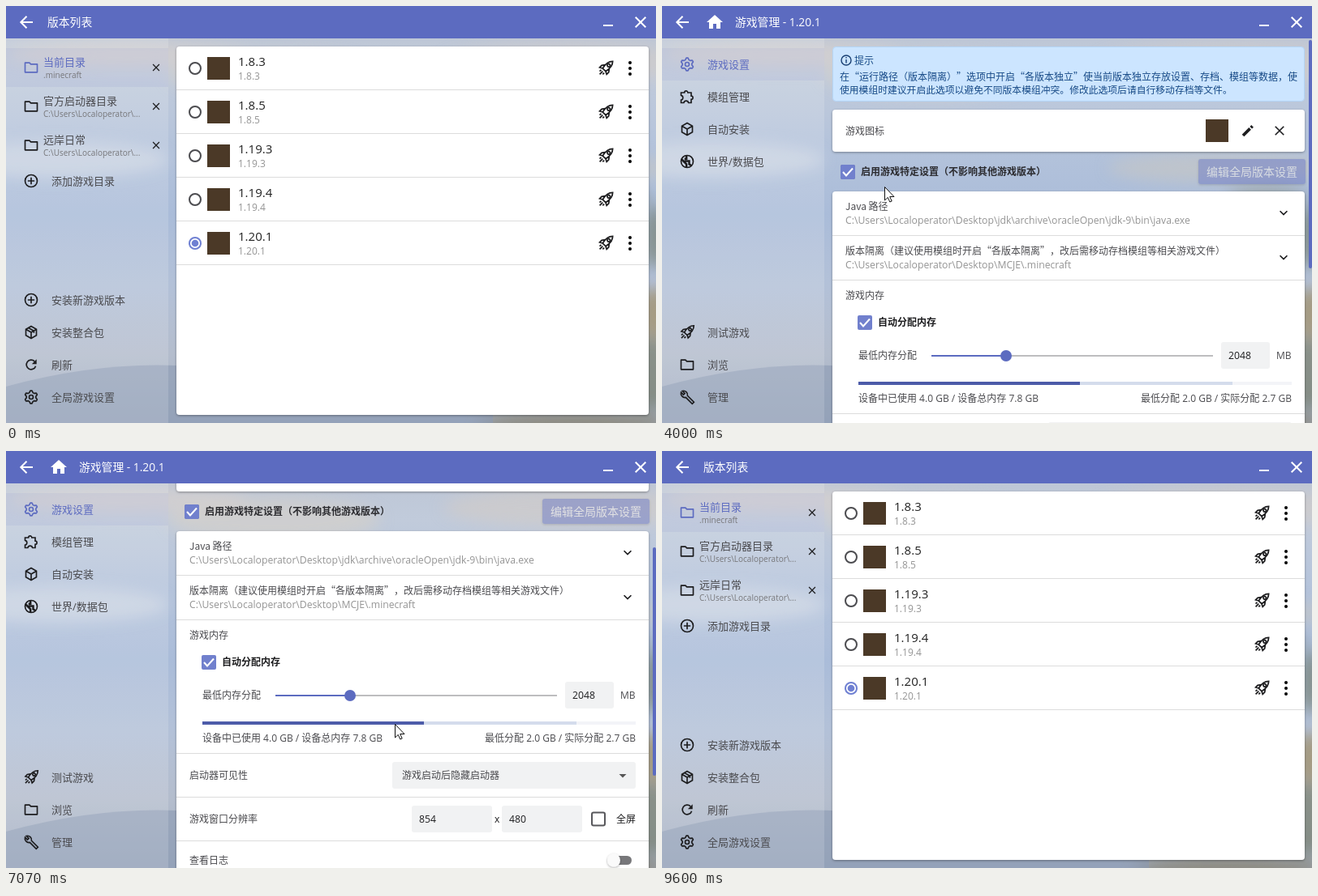
Animation, 801 px wide and 515 px high, one loop 9.99 s. Source, as an HTML page:

```html
<!DOCTYPE html>
<html lang="zh-CN">
<head>
<meta charset="utf-8">
<title>版本列表</title>
<style>
  html, body { margin: 0; width: 100%; height: 100%; overflow: hidden; background: #b4c3d9; }
  svg { display: block; width: 801px; height: 515px; }
  text { font-family: "Open Sans", "Noto Sans CJK SC", "Noto Sans CJK", sans-serif; white-space: pre; }
  .cjk { font-family: "Noto Sans CJK SC", "Noto Sans CJK", sans-serif; text-spacing-trim: space-all; }
  .icon { fill: none; stroke: currentColor; stroke-width: 2; }
  .solid { fill: currentColor; stroke: none; }
</style>
</head>
<body>
<svg id="stage" viewBox="0 0 801 515" xmlns="http://www.w3.org/2000/svg"></svg>
<script>
const LOOP = 9990, MAX_SCROLL = 325;
const BLUE = '#5c6bc0', INK = '#1d1d1f', TEXT = '#4a4a4e', GREY = '#949494', SOFT = '#f1f2f3';
const USER = 'C:\\Users\\Localoperator\\';
const BOLD = 'font-weight="700"', CJK = 'class="cjk"';

// Drawing helpers
const path = (d, attrs = '') => `<path d="${d}" ${attrs}/>`;
const circle = (x, y, r, attrs = '') => `<circle cx="${x}" cy="${y}" r="${r}" ${attrs}/>`;
const rect = (x, y, w, h, fill, r = 0, attrs = '') =>
  `<rect x="${x}" y="${y}" width="${w}" height="${h}" rx="${r}" fill="${fill}" ${attrs}/>`;
const text = (x, y, s, size = 12, color = INK, attrs = '') =>
  `<text x="${x}" y="${y}" font-size="${size}" fill="${color}" ${attrs}>${s}</text>`;
const group = (body, attrs) => `<g ${attrs}>${body}</g>`;
const polar = (deg, r) => {
  const a = deg * Math.PI / 180;
  return `${(12 + r * Math.cos(a)).toFixed(2)} ${(12 + r * Math.sin(a)).toFixed(2)}`;
};
const ring = (n, point) => `M${Array.from({ length: n }, (_, i) => point(i)).join('L')}Z`;

// Icons on a 24 unit grid
const cube = path(ring(6, i => polar(i * 60 - 90, 9)) +
  [-150, -30, 90].map(a => `M12 12L${polar(a, 9)}`).join(''));
const gear = path(ring(24, i => polar(i * 15 - 97.5, i % 4 < 2 ? 9.6 : 7)), 'stroke-linejoin="round"') + circle(12, 12, 3);
const ICONS = {
  cube, gear,
  box: cube + path('M8 5.500L16 10V13'),
  back: path('M20 12H6M12.500 4.700L5.300 12L12.500 19.300'),
  home: path('M2 12L12 3L22 12H19V20H14V14H10V20H5V12Z', 'class="solid"'),
  close: path('M5.700 5.700L18.300 18.300M18.300 5.700L5.700 18.300'),
  chevron: path('M6.700 9.300L12 14.600L17.300 9.300'),
  folder: path('M3 5H9.500L11.500 7H21V19H3Z', 'stroke-linejoin="round"'),
  plus: circle(12, 12, 9) + path('M7 12H17M12 7V17'),
  refresh: path('M18.700 14A7 7 0 1 1 17 7') + path('M20 4V11H13Z', 'class="solid"'),
  pencil: path('M4 20L15.500 8.500M17 7L19.500 4.500', 'stroke-width="5"'),
  earth: circle(12, 12, 9) + path('M4 9L11 16V21M8 11.500H15V16L18 18M11 3V8H8', 'stroke-width="3"'),
  puzzle: path('M18 6H13A2.500 2.500 0 1 0 8 6H3V10A3.600 3.600 0 0 1 3 17V21H7A3.600 3.600 0 0 1 14 21H18V16A2.500 2.500 0 1 0 18 11Z'),
  wrench: path('M10 12.500L19.500 22L22 19.500L12.500 10A6 6 0 0 0 5 3L8.500 6.500L6.500 8.500L3 5A6 6 0 0 0 10 12.500Z'),
  rocket: group(path('M12-2C16 2 16.500 9 15 15H9C7.500 9 8 2 12-2ZM8 9L5 13V17L9 15M16 9L19 13V17L15 15M12 18V24M9 18V21M15 18V21') +
    circle(12, 6, 2), 'transform="rotate(45 12 12)"')
};
const icon = (name, cx, cy, size = 20, color = INK) =>
  group(ICONS[name], `class="icon" color="${color}" transform="translate(${cx - size / 2} ${cy - size / 2}) scale(${size / 24})"`);

// Widgets
const card = (y, h) => rect(210, y, 582, h, '#fff', 4, 'filter="url(#shadow)"');
const divider = y => rect(210, y, 582, 1, '#dcdcdc');
const block = (cx, cy) => rect(cx - 14, cy - 14, 28, 28, '#4b3927');
const title = (x, s) => text(x, 25, s, 13.8, '#fff', 'font-weight="500"');
const label = (y, s) => text(226, y, s, 12, TEXT, CJK);
const emptyBox = (cx, cy) => rect(cx - 8, cy - 8, 16, 16, 'none', 2, 'stroke="#58585c" stroke-width="2"');
const tickBox = (cx, cy) => rect(cx - 9, cy - 9, 18, 18, '#7180cd', 2) +
  path(`M${cx - 6} ${cy}l4 4.500 8-9`, 'fill="none" stroke="#fff" stroke-width="2"');
const field = (x, y, w, s) => rect(x, y, w, 33, SOFT, 3) + text(x + 9, y + 21, s, 12.2);
const choice = s => rect(476, 10.5, 300, 33, SOFT, 3) + text(488, 31.5, s, 12, TEXT) +
  path('M755.500 25.500h9l-4.500 4.500z', 'fill="#555"');
const selected = h => rect(0, 52, 200, h, BLUE, 0, 'opacity=".08"');

// Sidebar entries 40 px apart
const menu = (top, items, active) => items.map(([name, s], i) => {
  const cy = top + i * 40, on = i === active;
  return icon(name, 31, cy, 20, on ? BLUE : INK) + text(56, cy + 5, s, 13, on ? BLUE : TEXT);
}).join('');

function listPage() {
  const folders = [['当前目录', '.minecraft'], ['官方启动器目录', USER + '...'], ['远岸日常', USER + '...']];
  const versions = ['1.8.3', '1.8.5', '1.19.3', '1.19.4', '1.20.1'];
  return title(51, '版本列表') + selected(48) +
    folders.map(([name, dir], i) => {
      const cy = 76 + i * 48, color = i ? INK : BLUE;
      return icon('folder', 31, cy, 20, color) + text(46, cy - 2, name, 13, i ? TEXT : BLUE) +
        text(46, cy + 13, dir, 10, '#77777a') + icon('close', 185, cy, 15);
    }).join('') +
    menu(216, [['plus', '添加游戏目录']]) +
    menu(363, [['plus', '安装新游戏版本'], ['box', '安装整合包'], ['refresh', '刷新'], ['gear', '全局游戏设置']]) +
    card(50, 455) +
    versions.map((v, i) => {
      const cy = 77 + i * 54, on = v === '1.20.1', color = on ? '#6f80d2' : '#4c4c50';
      return circle(233, cy, 7, `fill="none" stroke="${color}" stroke-width="2"`) +
        (on ? circle(233, cy, 4.3, `fill="${color}"`) : '') +
        block(262, cy) + text(286, cy - 3, v, 15, '#222') + text(286, cy + 14, v, 12, GREY) +
        icon('rocket', 739, cy, 21) + [-7, 0, 7].map(d => circle(769, cy + d, 2)).join('') + divider(cy + 26);
    }).join('');
}

const fade = body => group(body, 'class="fade"');
const pathRow = (s, id) =>
  fade(label(23, s) + text(226, 40.5, '', 12.2, GREY, `id="${id}"`) + icon('chevron', 766, 27));

// Rows of the large card: height and content
const SECTIONS = [
  [55, pathRow('Java 路径', 'java')],
  [55, pathRow('版本隔离（建议使用模组时开启“各版本隔离”，改后需移动存档模组等相关游戏文件）', 'dir')],
  [165, fade(label(23, '游戏内存') + tickBox(250, 52.5) + text(266, 56.5, '自动分配内存', 12, INK, BOLD) +
    text(242, 97.5, '最低内存分配', 12, TEXT) +
    rect(424, 92.5, 255, 2, '#bdbdbf') + rect(332, 92.5, 92, 2, BLUE) + circle(424, 93.5, 7, `fill="${BLUE}"`) +
    field(689, 76.5, 60, '2048') + text(757, 97.5, 'MB', 12, TEXT)) +
    rect(242, 125.5, 534, 4, '#f3f4f8') + rect(242, 125.5, 461, 4, '#d4dcec') + rect(242, 125.5, 273, 4, '#4d5ca9') +
    text(242, 150.5, '设备中已使用 4.0 GB / 设备总内存 7.8 GB', 12, TEXT) +
    text(776, 150.5, '最低分配 2.0 GB / 实际分配 2.7 GB', 12, TEXT, 'text-anchor="end"')],
  [54, fade(label(31.5, '启动器可见性') + choice('游戏启动后隐藏启动器'))],
  [54, fade(label(31.5, '游戏窗口分辨率') + field(500, 10.5, 99, '854') + text(602, 31.5, 'x') +
    field(611, 10.5, 99, '480') + emptyBox(730, 27) + text(752, 31.5, '全屏'))],
  [48, fade(label(28.5, '查看日志') + rect(745, 18.5, 26, 11, '#77777a', 5.5) +
    circle(749, 24, 8, 'fill="#fafafa" filter="url(#shadow)"'))],
  [54, fade(label(31.5, '进程优先级') + choice(''))],
  [54, fade(label(31.5, '服务器地址') + field(476, 10.5, 300, ''))]
];

function settingsForm() {
  const notice = '#174a86';
  let y = 228.5, rows = '';
  for (const [height, body] of SECTIONS) {
    rows += group(body, `transform="translate(0 ${y})"`) + divider(y + height - .5);
    y += height;
  }
  return rect(210.5, 50.5, 581, 67, '#cce5ff', 4, 'stroke="#b4d5f7"') +
    group(circle(227, 67, 6) + path('M227 66V70.500M227 63V64.600'), 'fill="none" stroke="#183f73" stroke-width="1.400"') +
    text(237, 71.5, '提示', 12, notice) +
    text(219, 91.5, '在“运行路径（版本隔离）”选项中开启“各版本独立”使当前版本独立存放设置、存档、模组等数据，使', 12, notice, CJK) +
    text(219, 107.5, '使用模组时建议开启此选项以避免不同版本模组冲突。修改此选项后请自行移动存档等文件。', 11.8, notice, CJK) +
    card(128, 52) + label(158.5, '游戏图标') + block(684, 154) + icon('pencil', 722, 154, 18) + icon('close', 761, 154) +
    emptyBox(229, 205) + group(tickBox(229, 205), 'id="tick"') +
    text(245, 209, '启用游戏特定设置（不影响其他游戏版本）', 12, '#2c2c30', CJK + ' ' + BOLD) +
    group(rect(661, 189, 132, 31, BLUE, 3, 'filter="url(#shadow)"') +
      text(727, 210, '编辑全局版本设置', 14, '#fff', 'text-anchor="middle"'), 'id="edit"') +
    card(229, y - 229) + rows;
}

function settingsPage() {
  return icon('home', 65, 20, 24, '#fff') + title(90, '游戏管理 - 1.20.1') + selected(40) +
    menu(72, [['gear', '游戏设置'], ['puzzle', '模组管理'], ['cube', '自动安装'], ['earth', '世界/数据包']], 0) +
    menu(403, [['rocket', '测试游戏'], ['folder', '浏览'], ['wrench', '管理']]) +
    group(group(settingsForm(), 'id="scroll"'), 'clip-path="url(#view)"') +
    rect(797, 42, 4, 282, BLUE, 2, 'id="bar"');
}

function backdrop() {
  const puff = (x, y, rx, ry, color) =>
    `<ellipse cx="${x}" cy="${y}" rx="${rx}" ry="${ry}" fill="${color}" opacity=".6"/>`;
  return rect(0, 0, 801, 515, 'url(#sky)') + group(
    puff(150, 60, 150, 16, '#dcd3cc') + puff(330, 85, 130, 28, '#d8d0c8') + puff(700, 70, 160, 24, '#d2cbc6') +
    puff(60, 190, 140, 22, '#d6dce6') + puff(690, 200, 140, 18, '#c9c7c3') +
    puff(745, 236, 50, 10, '#7d8574') + puff(800, 285, 14, 40, '#687059') +
    puff(800, 380, 24, 32, '#9c8450') + puff(795, 455, 34, 45, '#6d735c') + puff(700, 515, 120, 14, '#7d7254'),
    'filter="url(#blur)"') + path('M0 470Q110 440 210 444L600 500V515H0Z', 'fill="#8a99b2" opacity=".6"');
}

function pointer() {
  const fingers = [3, 2, 1, 0].map(i => rect(-2 + i * 3, i && 6 + i / 2, 3.6, 13, '#fff', 1.8)).join('');
  return path('M.5.5V17L4.300 13.400L6.800 19L9.200 18L6.700 12.500H12Z', 'id="arrow"') +
    group(fingers + path('M-2 13L-4 11Q-7 10-6 12.500L-1 20V23H9V20Q10.500 17 10.500 12'), 'id="hand"');
}

const sky = ['#bbc3d2', '#c1cbdb', '#b4c3db', '#aabcd9', '#b3c1d8', '#b4bdcd', '#a3afc2'];
document.getElementById('stage').innerHTML = `<defs>
  <linearGradient id="sky" x2="0" y2="1">${sky.map((c, i) => `<stop offset="${i / (sky.length - 1)}" stop-color="${c}"/>`).join('')}</linearGradient>
  <filter id="blur" x="-20%" y="-20%" width="140%" height="140%"><feGaussianBlur stdDeviation="9"/></filter>
  <filter id="shadow" x="-10%" y="-20%" width="120%" height="150%"><feDropShadow dx="0" dy="1" stdDeviation="1.800" flood-opacity=".35"/></filter>
  <clipPath id="view"><path d="M200 40H801V515H200Z"/></clipPath></defs>` +
  backdrop() + rect(0, 40, 200, 475, '#fff', 0, 'opacity=".15"') + rect(0, 0, 801, 40, BLUE) +
  group(listPage(), 'id="list"') + group(settingsPage(), 'id="settings"') +
  icon('back', 25, 20, 24, '#fff') + rect(736, 23, 12, 2, '#fff') + icon('close', 782, 20, 24, '#fff') +
  group(pointer(), 'id="cursor" fill="#fff" stroke="#111" stroke-linejoin="round"');

const el = Object.fromEntries([...document.querySelectorAll('[id]')].map(node => [node.id, node]));
const faded = document.querySelectorAll('.fade');

// Pointer moves: start, end, x, y
const MOVES = [
  [670, 1600, 438, 300], [2470, 3130, 228, 205], [3600, 4000, 273, 223], [4000, 4400, 488, 345],
  [6530, 7070, 479, 337], [7530, 7870, 149, 116], [7870, 8400, 12, 24], [8600, 9530, 812, 125]
];
const ramp = (t, from, to) => Math.min(1, Math.max(0, (t - from) / (to - from)));
const set = (node, name, value) => node.setAttribute(name, value);
const show = (node, opacity) => {
  set(node, 'opacity', opacity);
  set(node, 'visibility', opacity > 0 ? 'visible' : 'hidden');
};

// Steady scroll down, then a decaying scroll back up
const scrollAt = t => MAX_SCROLL * (t < 6530 ? ramp(t, 4730, 6120) : (1 - ramp(t, 6530, 8050)) ** 2.09);

function pointerAt(t) {
  let x = 798, y = 118;
  for (const [from, to, nx, ny] of MOVES) {
    const p = ramp(t, from, to);
    x += (nx - x) * p;
    y += (ny - y) * p;
  }
  return [x, y];
}

function render(t) {
  const page = ramp(t, 1600, 1860) - ramp(t, 8460, 8720);
  show(el.list, 1 - page);
  show(el.settings, page);

  const own = t >= 3460;
  show(el.tick, ramp(t, 3400, 3600));
  set(el.edit, 'opacity', own ? .42 : 1);
  faded.forEach(node => set(node, 'opacity', own ? 1 : .4));
  el.java.textContent = own
    ? USER + 'Desktop\\jdk\\archive\\oracleOpen\\jdk-9\\bin\\java.exe'
    : 'C:\\Program Files\\Eclipse Adoptium\\jre-17.0.8.7-hotspot\\bin\\java.exe';
  el.dir.textContent = USER + 'Desktop\\MCJE\\.minecraft' + (own ? '' : '\\versions\\1.20.1');

  const scroll = scrollAt(t);
  set(el.scroll, 'transform', `translate(0 ${-Math.round(scroll)})`);
  set(el.bar, 'y', 42 + scroll * .594);

  const [x, y] = pointerAt(t);
  const hand = page < .5 || x < 200;
  set(el.cursor, 'transform', `translate(${Math.round(x)} ${Math.round(y)})`);
  set(el.cursor, 'display', t >= 670 && t < 9530 ? 'inline' : 'none');
  set(el.hand, 'display', hand ? 'inline' : 'none');
  set(el.arrow, 'display', hand ? 'none' : 'inline');
}

const start = performance.now();
function tick(now) {
  render(Math.max(0, now - start) % LOOP);
  requestAnimationFrame(tick);
}
render(0);
requestAnimationFrame(tick);
</script>
</body>
</html>
```
